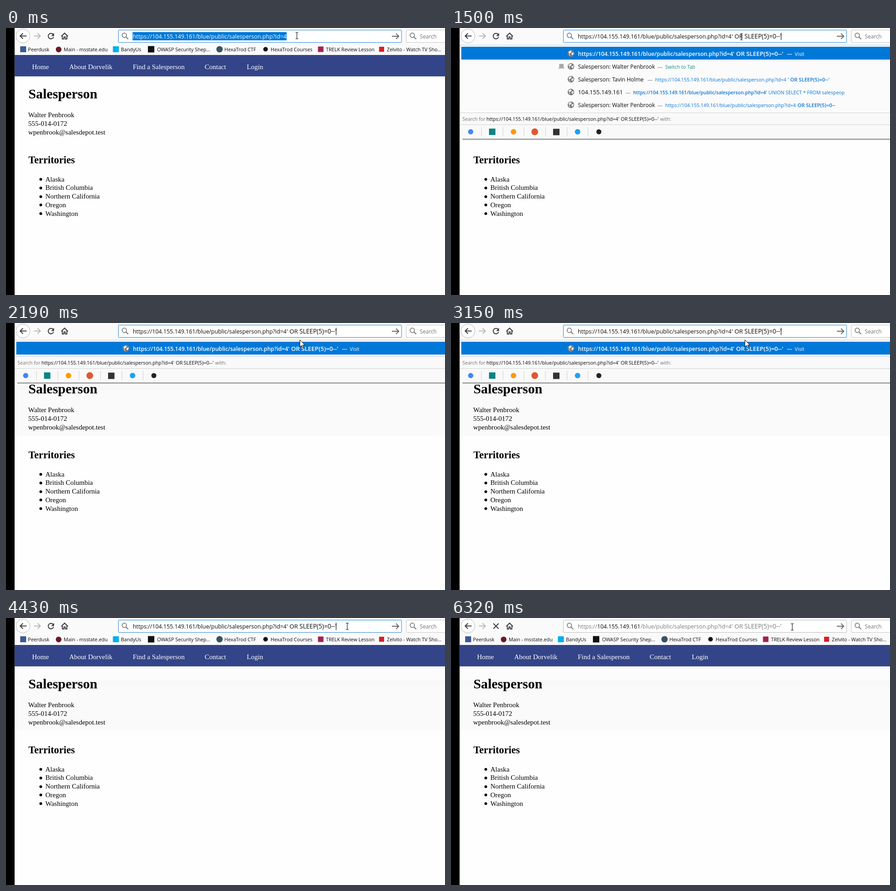
Animation, 959 px wide and 584 px high, one loop 8000 ms. Source, as an HTML page:

```html
<!DOCTYPE html>
<html lang="en">
<head>
<meta charset="utf-8">
<title>Browser session</title>
<style>
html, body { margin: 0; width: 100%; height: 100%; overflow: hidden; background: #fff; }
svg { display: block; width: 959px; height: 584px; }
text { white-space: pre; font-family: "Open Sans", "Noto Sans", sans-serif; }
.page text { font-family: "Liberation Serif", "Times New Roman", serif; }
</style>
</head>
<body>
<svg id="stage" viewBox="0 0 959 584" xmlns="http://www.w3.org/2000/svg"></svg>
<script>
const LOOP = 8000;
const INK = "#0c0c0d", GREY = "#737373", BLUE = "#0078d7", LINK = "#0a74d6", TEAL = "#0f8f7d";
const SEMI = 'font-weight="600"', BOLD = 'font-weight="700"';

const text = (x, y, s, size, fill = INK, more = "") =>
  `<text x="${x}" y="${y}" font-size="${size}" fill="${fill}" ${more}>${s}</text>`;
const rect = (x, y, w, h, fill, more = "") =>
  `<rect x="${x}" y="${y}" width="${w}" height="${h}" fill="${fill}" ${more}/>`;
const dot = (x, y, r, fill, more = "") =>
  `<circle cx="${x}" cy="${y}" r="${r}" fill="${fill}" ${more}/>`;
const square = (x, y, size, fill) => rect(x - size / 2, y - size / 2, size, size, fill);
const line = (d, stroke, width = 1, more = "") =>
  `<path d="${d}" fill="none" stroke="${stroke}" stroke-width="${width}" ${more}/>`;
const group = (id, body, more = "") => `<g id="${id}" ${more}>${body}</g>`;

const HOST = "104.155.149.161";
const PATH = "/blue/public/salesperson.php?id=4";
const ADDRESS = "https://" + HOST + PATH;
const PERSON = "Walter Penbrook";

function page() {
  const nav = [[57, "Home"], [138, "About Dorvelik"], [277, "Find a Salesperson"], [434, "Contact"], [526, "Login"]];
  const details = [PERSON, "555-014-0172", "wpenbrook@salesdepot.test"];
  const places = ["Alaska", "British Columbia", "Northern California", "Oregon", "Washington"];
  const row = (top, i) => Math.round(top + 18.75 * i);
  return rect(19, 59, 940, 525, "#fefefe") +
    group("tint", rect(19, 106, 940, 30, "#fcfcfc") + rect(19, 136, 940, 11, "#f8f8f8") + rect(19, 147, 940, 99, "#fafafa")) +
    rect(19, 59, 940, 46.5, "#334488") + rect(19, 104.5, 940, 1, "#2b3a78") +
    nav.map(([x, s]) => text(x, 90, s, 15, "#fff")).join("") +
    text(49, 154, "Salesperson", 29.8, "#000", BOLD) +
    details.map((s, i) => text(48.5, row(195.3, i), s, 15, "#000")).join("") +
    text(49, 296, "Territories", 22.2, "#000", BOLD) +
    places.map((s, i) => dot(76, row(331.2, i), 3, "#000") + text(86, row(335.7, i), s, 15, "#000")).join("");
}

function magnifier(x, y) {
  return dot(x - 1.5, y - 1.5, 4.8, "none", 'stroke="#777" stroke-width="1.7"') +
    line(`M${x + 2} ${y + 2}L${x + 7} ${y + 7}`, "#777", 2);
}

function arrow(x, y, length, head, stroke, width = 2) {
  const s = Math.sign(length);
  return line(`M${x} ${y}h${length}m${-s * head} ${-head}l${s * head} ${head}l${-s * head} ${head}`, stroke, width);
}

function toolbar() {
  return rect(19, 0, 940, 59, "#fafafa") +
    dot(37, 17.5, 15.3, "#fff", 'stroke="#b4b4b4"') +
    arrow(45, 17.5, -14, 6, "#3a3a3e") + arrow(61, 17.5, 14, 6, "#b8b8b8") +
    group("reload", line("M103.2 14.2A6 6 0 1 0 104 19.5", "#3a3a3e", 2) +
      `<path d="M105 11v6.5h-6.5z" fill="#3a3a3e"/>`) +
    group("stop", line("M92.5 12l11.5 11.5M104 12l-11.5 11.5", "#3a3a3e", 2)) +
    line("M120.8 18.3L128 11.2L135.2 18.3M123 17v7h3.5v-4.5h3v4.5h3.5v-7", "#3a3a3e", 1.9) +
    `<rect id="field" x="245.5" y="4.5" width="618.5" height="27" rx="1" fill="#fff"/>` +
    magnifier(260, 17.5) + arrow(843, 18, 15, 6, "#666", 1.8) +
    rect(874.5, 4.5, 100, 27, "#fff", 'rx="1" stroke="#c4c4c4"') +
    magnifier(889, 17.5) + text(904, 23, "Search", 11.7, GREY);
}

function bookmarks() {
  const titles = [
    [48, "Peerdusk"], [126, "Main - msstate.edu"], [251, "BandyUs"], [330, "OWASP Security Shep..."],
    [477, "HexaTrod CTF"], [578, "HexaTrod Courses"], [699, "TRELK Review Lesson"], [832, "Zelvito - Watch TV Sho..."]
  ];
  return square(37.5, 46.5, 13, "#3b5998") + dot(115, 47, 6.2, "#6b1a22") +
    square(240, 46.5, 13, "#00aff0") + square(317, 46.5, 14, "#111") +
    dot(466.5, 46.5, 7, "#3b5262") + dot(567, 46.5, 5, "#111") +
    square(687.5, 46.5, 12, "#a3214e") + square(820.5, 46.5, 11, "#d81f26") +
    titles.map(([x, s]) => text(x, 50.5, s, 10.75)).join("");
}

function globe(y) {
  return dot(262, y, 6.9, "#6c6c6c", 'stroke="#9a9a9a" stroke-width=".8"') +
    `<path d="M256.5 ${y - 3}l4-3l4 1.5l-3 3.5l-3 2.5zM263 ${y - .5}l4-2l1 3l-3 4l-2-2zM256.5 ${y + 1}l4 2l0 3z" fill="#ececec"/>`;
}

// Injected part of the query is set slightly larger than the address.
function query(x, y, size, tailX, wordX, tailSize, fill, more = "") {
  return text(x, y, ADDRESS, size, fill, more) + text(tailX, y, "' OR", tailSize, fill, more) +
    text(wordX, y, "SLEEP(5)=0--'", tailSize, fill, more);
}

function suggestions() {
  const dash = (x, y) => text(x, y, "—", 11.5, GREY);
  const title = (y, s, size = 12) => globe(y - 5) + text(277.5, y, s, size);
  return `<path d="M236.5 78.5h9.5v7l2 3h-14l2.5-3z" fill="#a9a9a9"/>` +
    title(89, "Salesperson: " + PERSON) + dash(451, 89) + text(468, 89, "Switch to Tab", 10.7, TEAL) +
    title(117, "Salesperson: Tavin Holme") + dash(429, 117) +
    text(446, 117, ADDRESS, 10.55, LINK) + text(735.5, 117, "' OR SLEEP(5)=0--'", 11.1, LINK, SEMI) +
    title(145, HOST, 12.8) + dash(381, 145) + text(398, 145, ADDRESS + "'", 10.4, LINK, SEMI) +
    text(693.5, 145, "UNION SELECT * FROM salespeop", 10.55, LINK) +
    title(173, "Salesperson: " + PERSON) + dash(451, 173) +
    text(468, 173, ADDRESS, 10.5, LINK) + text(757, 173, "OR SLEEP(5)=0--", 11, LINK, SEMI);
}

function engines() {
  const xs = [66, 113, 159, 206, 253, 299];
  return `<rect x="25" y="244" width="934" height="2" fill="url(#shade)"/>` +
    rect(19, 185, 940, 57, "#f9f9f9") + rect(19, 185, 940, 1, "#d2d2d2") + rect(19, 211, 940, 1, "#d2d2d2") +
    rect(25, 242, 934, 2, "#989898") +
    text(25, 202.5, "Search for", 10.5, GREY) +
    query(77.5, 202.5, 10.6, 365.5, 388, 11, INK) + text(457, 202.5, "with:", 10.6, GREY) +
    xs.map(x => rect(x, 217, 1, 20, "#cfcfcf")).join("") +
    dot(43, 227, 5.7, "#4285f4") + square(90, 227, 14, "#0c8484") + dot(136.5, 227, 6, "#f90") +
    dot(183, 227, 7.4, "#de5833") + square(230, 227.5, 14, "#333") +
    dot(276.5, 227, 6, "#1da1f2") + dot(323, 227, 5.5, "#222");
}

function dropdown() {
  return `<rect id="panel" x="19" y="37" width="940" height="206" fill="#fbfbfb"/>` +
    rect(19, 37, 940, 1, "#c9c9c9") + rect(22.5, 41, 936.5, 28, BLUE) + globe(55.5) +
    query(277.5, 60.7, 12.15, 616, 645, 13.4, "#fff", SEMI) +
    text(733.5, 60.7, "—", 12, "#fff") + text(751, 60.7, "Visit", 10.8, "#fff") +
    group("rows", suggestions()) + group("engines", engines());
}

function address() {
  return rect(276.5, 9, 336.5, 18, BLUE, 'id="selection"') +
    `<text id="url" x="277" y="23" font-size="12.37"><tspan class="dim">https://</tspan><tspan fill="${INK}" id="host">${HOST}</tspan><tspan class="dim">${PATH}</tspan></text>` +
    group("tail", text(613, 23, "' OR", 13.2, "inherit", 'class="dim"') + text(641, 23, "SLEEP(5)=0--'", 13.6, "inherit", 'class="dim"')) +
    rect(0, 10.5, 1.1, 16, "#000", 'id="caret"');
}

const stage = document.getElementById("stage");
stage.innerHTML =
  `<defs><linearGradient id="shade" x2="0" y2="1"><stop stop-color="#c4c4c4"/><stop offset="1" stop-color="#fefefe"/></linearGradient></defs>` +
  group("page", page(), 'class="page"') + toolbar() + group("bookmarks", bookmarks()) +
  group("dropdown", dropdown()) + address() +
  group("beam", line("M-3 -7h2.2l.8.8l.8-.8h2.2M0 -6.2v12.4M-3 7h2.2l.8-.8l.8.8h2.2", "#111", 1.1)) +
  group("pointer", `<path d="M0 0v15.5l3.6-3.4l2.4 5.4l2.4-1l-2.4-5.3h5z" fill="#fff" stroke="#000"/>`) +
  rect(0, 0, 18, 584, "#000") + rect(18, 0, 1, 584, "#333");

const el = id => document.getElementById(id);
const dims = document.querySelectorAll(".dim");
const show = (id, on) => el(id).style.display = on ? "" : "none";

// Last entry whose time has been reached.
const at = (track, t) => track.reduce((found, key) => key[0] <= t ? key : found);

const MOUSE = [
  [0, "beam", 635.5, 16.7], [130, "beam", 635.5, 18], [680, "beam", 635.5, 19], [1500, "beam", 634.5, 19],
  [1800, "beam", 638, 25], [1920, "pointer", 642, 33.5], [2040, "pointer", 642, 37],
  [3740, "beam", 678, 27], [3870, "beam", 722, 24], [3990, "beam", 745.5, 22],
  [4130, "beam", 745.5, 19], [4430, "beam", 745.5, 18.3], [5020, "beam", 745.5, 19.5]
];
const BLINKS = [390, 680, 1110, 1660, 2190, 2590, 3150, 3740, 4290, 4740, 5270, 5800];
const PANEL = [[0, 0], [1920, -101], [2040, -112]];

function draw(t) {
  const pasted = t >= 1500, loading = t >= 5950, open = pasted && t < 4430;

  show("selection", t < 390);
  show("tail", pasted);
  const ink = t < 390 ? "#fff" : INK;
  el("host").setAttribute("fill", ink);
  dims.forEach(n => n.setAttribute("fill", loading ? "#7b7b7b" : ink));
  el("field").setAttribute("stroke", loading ? "#b9b9b9" : "#2484d2");

  show("caret", BLINKS.filter(b => b <= t).length % 2 === 1);
  el("caret").setAttribute("x", pasted ? 720.6 : 613);

  const shift = at(PANEL, t)[1];
  show("dropdown", open);
  show("bookmarks", !open);
  show("rows", shift === 0);
  show("tint", t >= 1920);
  el("panel").setAttribute("height", 206 + shift);
  el("engines").setAttribute("transform", `translate(0 ${shift})`);

  show("reload", !loading);
  show("stop", loading);
  el("stop").setAttribute("opacity", Math.min(1, 0.4 + Math.max(0, t - 5950) / 500));

  const [, shape, x, y] = at(MOUSE, t);
  show("beam", shape === "beam");
  show("pointer", shape === "pointer");
  el(shape).setAttribute("transform", `translate(${x} ${y})`);
}

function tick() {
  draw(performance.now() % LOOP);
  requestAnimationFrame(tick);
}
tick();
</script>
</body>
</html>
```
